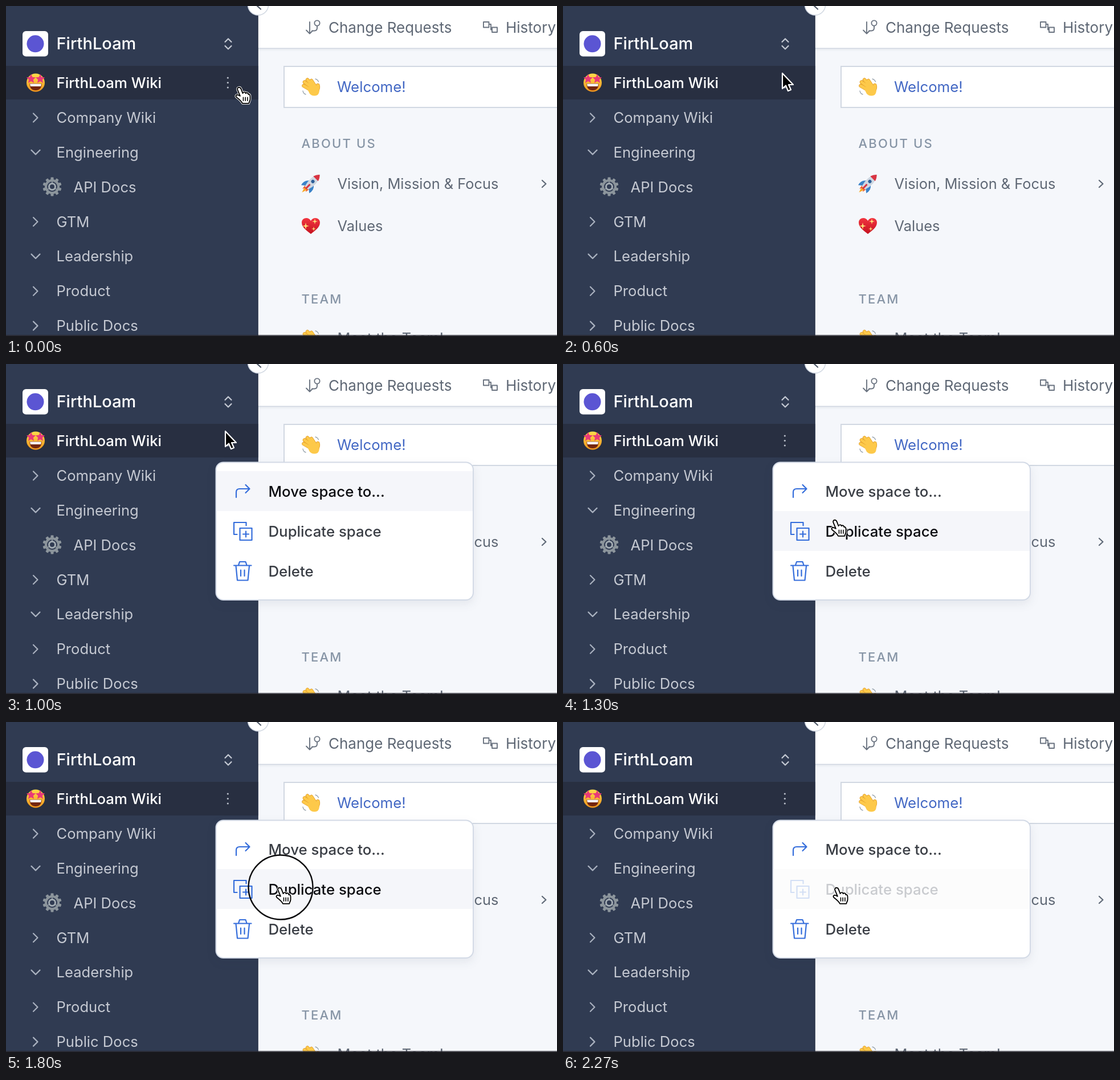
These frames come from a looping animation (967x579 px, 2.44 s). An HTML page:

```html
<!DOCTYPE html>
<html lang="en">
<head>
<meta charset="utf-8">
<title>Space menu</title>
<style>
  html, body { margin: 0; width: 100%; height: 100%; overflow: hidden; background: #f5f7fb; }
  svg { display: block; width: 967px; height: 579px; }
  text { font-family: Inter, "Liberation Sans", sans-serif; font-size: 25.8px; white-space: pre; }
  .line { fill: none; stroke-linecap: round; stroke-linejoin: round; stroke-width: 2.2; }
  .side { fill: #c5c9d2; font-size: 25.6px; }
  .chev { stroke: #a9b1bf; }
  .page { fill: #5f6875; }
  .list { font-size: 25.4px; }
  .head { fill: #8795a6; font-size: 22px; font-weight: 500; letter-spacing: 2.2px; }
  .item text { font-weight: 500; fill: #3a3e45; }
  .item .line { stroke: #346ddb; }
  .item .bg { fill: none; }
  .item.on .bg { fill: #f5f6fa; }
  .item.on text { fill: #0b0c10; }
  .item.off .bg { fill: #fcfcfc; }
  .item.off text { fill: #c9cbcf; }
  .item.off .line { stroke: #d3dff5; }
  #panel { fill: #fff; stroke: #d3dae6; stroke-width: 2; filter: drop-shadow(0 6px 8px rgba(30, 40, 70, .08)); }
</style>
</head>
<body>
<svg viewBox="0 0 967 579" xmlns="http://www.w3.org/2000/svg">
  <defs>
    <linearGradient id="gold" x2="0" y2="1"><stop stop-color="#ffdc4a"/><stop offset="1" stop-color="#f0941d"/></linearGradient>
    <linearGradient id="red" x2="0" y2="1"><stop stop-color="#f23540"/><stop offset="1" stop-color="#c5121f"/></linearGradient>
    <path id="fingers" d="M3 7L-12.500 -2M5 3L-11 -8.500M7 1L-6 -12.500M9 1L1 -11M10 8Q14 3 12.500 -3"/>
    <path id="palm" d="M-3 4C-4 -1 2 -2 4 3L7 11C8 8 12 8 12.500 11C14 9 17.500 10 17.500 13C19.500 12 21 14 21 17V22C21 25 19 27 18.500 30H6.500C5 27 0 22 -4 19C-8 16 -5 13 -2 14L2 16Z"/>
    <g id="wave">
      <g fill="none" stroke-linecap="round">
        <use href="#fingers" stroke="#e09a28" stroke-width="6.500"/>
        <use href="#fingers" stroke="#fdc94a" stroke-width="5"/>
      </g>
      <path fill="#fdc94a" d="M-7 2L7 -5L13 1Q17 9 12 14Q4 18 -2 12Z"/>
      <path class="line" stroke="#9ba6b0" style="stroke-width:1.300" d="M8 -14q4 1 5.500 5M-14 7q1 5 5 6"/>
    </g>
  </defs>

  <!-- page -->
  <rect width="967" height="579" fill="#f5f7fb"/>
  <rect x="442" y="75" width="525" height="4" fill="#eff2f6"/>
  <rect x="442" width="525" height="74" fill="#fff"/>
  <rect x="442" y="73.500" width="525" height="2" fill="#d3dae3"/>
  <g class="line" stroke="#6a7380" style="stroke-width:1.900">
    <circle cx="546" cy="30" r="4.600"/>
    <path d="M546 35v3.500q0 5-5 5h-4M533 28v20M527 42.500l6 6 5-5"/>
    <path d="M838 28h9.500v9.500h-9.500zM853 37.500h9v8.500h-9zM847.500 32h3.500v9.500h2"/>
  </g>
  <text class="page" x="566" y="46.500" style="font-size:26px">Change Requests</text>
  <text class="page" x="877" y="46.500" style="font-size:26px">History</text>
  <rect x="488" y="106" width="500" height="72" fill="#fff" stroke="#d1d8e2" stroke-width="2"/>
  <text x="581" y="151" fill="#4368c4">Welcome!</text>
  <text class="head" x="518.500" y="249">ABOUT US</text>
  <text class="page list" x="581.500" y="321">Vision, Mission &amp; Focus</text>
  <path class="line" stroke="#5f6977" d="M941 306l6.500 6-6.500 6"/>
  <text class="page list" x="581.500" y="394.500">Values</text>
  <text class="head" x="518.500" y="522">TEAM</text>
  <text class="page list" x="581.500" y="592">Meet the Team!</text>

  <use href="#wave" x="535" y="142"/>
  <use href="#wave" x="535" y="584"/>
  <g transform="translate(535 311.500) rotate(45)">
    <path fill="#f7a928" d="M-4 10L0 22L4 10Z"/>
    <path fill="#ef5a2a" d="M-5 9L-4 17L-1 11ZM5 9L4 17L1 11Z"/>
    <path fill="#3b83c9" d="M-5 -2Q-13 4 -10 14L-4 9ZM5 -2Q13 4 10 14L4 9Z"/>
    <path fill="#cfd8e2" d="M0 -22Q8 -13 6 2L4 11H-4L-6 2Q-8 -13 0 -22Z"/>
    <path fill="#d93442" d="M0 -22Q4.500 -18 6 -12H-6Q-4.500 -18 0 -22Z"/>
    <circle cy="-5" r="3" fill="#2e5f99"/>
    <path fill="#d93442" d="M-1.500 2h3v11h-3z"/>
  </g>
  <path fill="url(#red)" d="M535 400C529 395 519 389 519 380C519 371 531 369 535 377C539 369 551 371 551 380C551 389 541 395 535 400Z"/>
  <g id="sparks" fill="#ffe27a"></g>

  <!-- sidebar -->
  <rect width="442.500" height="579" fill="#303b52"/>
  <rect y="105" width="442.500" height="59" fill="#282f41"/>
  <rect x="441" width="1.500" height="579" fill="#293247"/>
  <circle cx="442.500" cy="-2" r="18" fill="#fff" stroke="#d0d7e1" stroke-width="1.500"/>
  <path class="line" stroke="#4f5968" d="M447 -8l-7 7 7 6.500"/>
  <rect x="29" y="44" width="45" height="44.500" rx="6" fill="#fff"/>
  <circle cx="51.500" cy="66.300" r="15" fill="#5b55d3"/>
  <text x="88.500" y="76" fill="#fff" style="font-size:29px;font-weight:500">FirthLoam</text>
  <path class="line" stroke="#c5cad4" d="M384.500 63l5.500-5.500 5.500 5.500M384.500 70l5.500 5.500 5.500-5.500"/>
  <text x="88.500" y="144" fill="#fff" font-weight="500">FirthLoam Wiki</text>
  <g fill="#b9bfca"><circle cx="389.300" cy="126" r="1.600"/><circle cx="389.300" cy="134.500" r="1.600"/><circle cx="389.300" cy="143" r="1.600"/></g>
  <g id="rows"></g>

  <circle cx="52" cy="134.500" r="16" fill="url(#gold)"/>
  <path fill="#74260f" d="M41.500 136h21q0 12-10.500 12t-10.500-12z"/>
  <path fill="#fff" d="M42 136.500h20l-1 4.500h-18z"/>
  <g id="eyes" fill="#e93a78"></g>
  <g transform="translate(81 317)">
    <g id="teeth" fill="#8d969d"></g>
    <circle r="11" fill="none" stroke="#8b949b" stroke-width="4"/>
    <path stroke="#87919a" stroke-width="2" d="M0 -10v4M8 5l-3-2M-8 5l3-2"/>
    <circle r="5.500" fill="none" stroke="#a3acb3" stroke-width="3"/>
  </g>

  <rect y="577" width="967" height="2" fill="#29272f" opacity=".75"/>

  <!-- menu -->
  <g id="menu">
    <rect id="panel" x="368.500" y="172.500" width="451.500" height="241.500" rx="13"/>
    <g class="item">
      <rect class="bg" x="369.500" y="188" width="449.500" height="70"/>
      <path class="line" d="M404 234v-9q0-6 6-6h16M420.500 212l7 7-7 7"/>
      <text x="460.500" y="232.500">Move space to...</text>
    </g>
    <g class="item">
      <rect class="bg" x="369.500" y="258" width="449.500" height="70"/>
      <path class="line" d="M405.500 299h-5.500v-21h21.500v5.500M410.500 288h21v21h-21zM421 293.500v10M416 298.500h10"/>
      <text x="460.500" y="302.500">Duplicate space</text>
    </g>
    <g class="item">
      <rect class="bg" x="369.500" y="328" width="449.500" height="70"/>
      <path class="line" d="M400 353.500h30.500M408 353l2-6h10.500l2 6M403.500 354l2.500 25.500h18.500l2.500-25.500M412 361.500v10.500M418.500 361.500v10.500"/>
      <text x="460.500" y="372.500">Delete</text>
    </g>
  </g>

  <!-- pointer -->
  <circle id="ring" cx="482" cy="290" r="56.500" fill="none" stroke="#0a0a0c" stroke-width="2.500"/>
  <path id="arrow" fill="#000" stroke="#fff" stroke-width="2.200" stroke-linejoin="round"
    d="M0 0V27L6 21.500L10 31L15 29L11 20H19Z"/>
  <g id="hand" stroke-linejoin="round" stroke-linecap="round">
    <g transform="scale(.93)">
      <use href="#palm" fill="#fff" stroke="#fff" stroke-width="4"/>
      <use href="#palm" fill="#fff" stroke="#000" stroke-width="2"/>
      <path fill="none" stroke="#000" stroke-width="1.700" d="M8 18.500v6.500M12 18.500v6.500M16 18.500v6.500"/>
    </g>
  </g>
</svg>
<script>
const $ = id => document.getElementById(id);
const LOOP = 2440, STEP = 100;

// Star polygon with n points around (x, y).
function star(x, y, n, outer, inner) {
  const pts = Array.from({ length: 2 * n }, (_, i) => {
    const a = Math.PI * (i / n - .5), r = i % 2 ? inner : outer;
    return `${x + r * Math.cos(a)},${y + r * Math.sin(a)}`;
  });
  return `<polygon points="${pts.join(' ')}"/>`;
}

$('eyes').innerHTML = star(44, 128, 5, 8.5, 4) + star(60, 128, 5, 8.5, 4);
$('sparks').innerHTML = star(526, 386, 4, 6, 1.7) + star(542, 378, 4, 5, 1.4) + star(540, 391, 4, 4, 1.2);
$('teeth').innerHTML = Array.from({ length: 10 }, (_, i) =>
  `<rect x="-2.500" y="-16.500" width="5" height="6" rx="1" transform="rotate(${i * 36})"/>`).join('');

const rows = [
  ['Company Wiki', 'right'], ['Engineering', 'down'], ['API Docs'], ['GTM', 'right'],
  ['Leadership', 'down'], ['Product', 'right'], ['Public Docs', 'right']
];
const chevrons = { right: 'M48 -7.500l7.500 7.500-7.500 7.500', down: 'M44.500 -4l7.500 7.500 7.500-7.500' };
$('rows').innerHTML = rows.map(([label, chev], i) => {
  const y = 196 + i * 60.85;
  return `<text class="side" x="${chev ? 88.5 : 118.5}" y="${y + 9}">${label}</text>` +
    (chev ? `<path class="line chev" transform="translate(0 ${y})" d="${chevrons[chev]}"/>` : '');
}).join('');

// Pointer tip: time, x, y
const path = [[0, 409, 143], [500, 385, 118], [1000, 385, 118], [1300, 477, 274], [1600, 480, 291]];

function tipAt(t) {
  const i = path.findIndex(k => k[0] > t);
  if (i < 0) return path[path.length - 1].slice(1);
  const a = path[i - 1], b = path[i], u = (t - a[0]) / (b[0] - a[0]), e = u * u * (3 - 2 * u);
  return [a[1] + (b[1] - a[1]) * e, a[2] + (b[2] - a[2]) * e];
}

const items = document.querySelectorAll('.item');
const show = (el, on) => { el.style.display = on ? '' : 'none'; };

function draw(time) {
  const t = Math.floor((time % LOOP) / STEP) * STEP;
  const [x, y] = tipAt(t);
  const open = t >= 700, entering = t < 800;
  const isArrow = t >= 600 && y < 172;
  const busy = t >= 2000;
  const active = y > 258 ? 1 : 0;

  show($('menu'), open);
  $('menu').setAttribute('opacity', entering ? .93 : 1);
  $('menu').setAttribute('transform', `translate(0 ${entering ? -1.3 : 0})`);
  items.forEach((el, i) => el.setAttribute('class',
    'item' + (i === active ? (busy ? ' off' : ' on') : '')));

  show($('ring'), t >= 1800 && t < 2000);
  show($('arrow'), isArrow);
  show($('hand'), !isArrow);
  $(isArrow ? 'arrow' : 'hand').setAttribute('transform', `translate(${x} ${y})`);
}

const start = performance.now();
function tick() {
  draw(performance.now() - start);
  requestAnimationFrame(tick);
}
tick();
</script>
</body>
</html>
```
